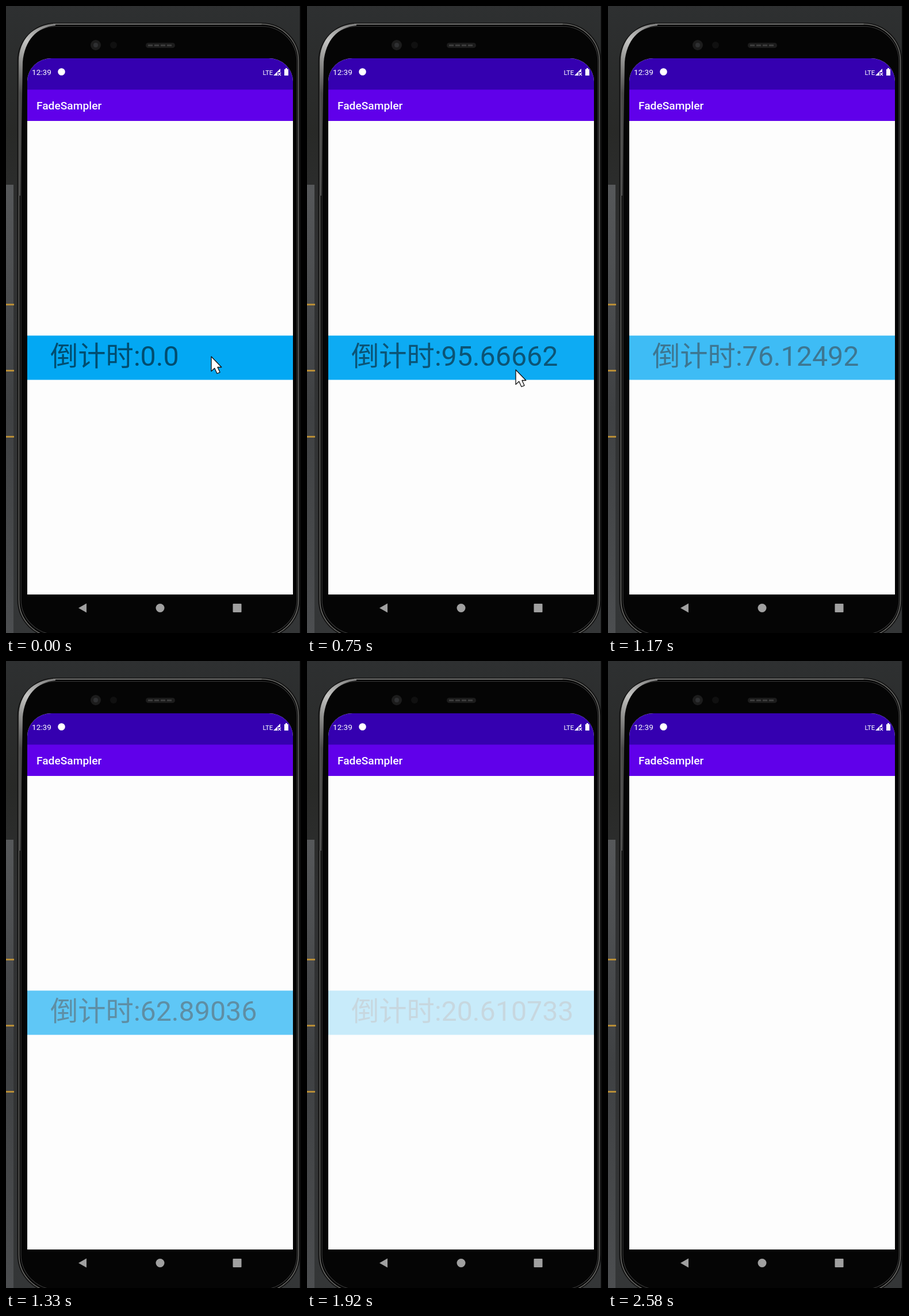
An HTML page for the animation above (2660 ms loop, 513 px wide and 1091 px high).

```html
<!DOCTYPE html>
<html lang="zh-CN">
<head>
<meta charset="utf-8">
<title>Fading countdown</title>
<style>
  html, body { margin: 0; width: 100%; height: 100%; overflow: hidden; background: #2d2e2e; }
  svg { display: block; position: fixed; inset: 0; width: 100%; height: 100%; }
  text { font-family: Roboto, "Noto Sans CJK SC", "Noto Sans CJK", sans-serif; }
</style>
</head>
<body>
<svg viewBox="0 0 513 1091" preserveAspectRatio="none">
  <defs>
    <linearGradient id="desk" x1="0" y1="0" x2="0" y2="1">
      <stop offset="0" stop-color="#2e3031"/>
      <stop offset=".2" stop-color="#282927"/>
      <stop offset=".4" stop-color="#303132"/>
      <stop offset="1" stop-color="#343637"/>
    </linearGradient>
    <linearGradient id="panel" x1="0" y1="0" x2="0" y2="1">
      <stop offset="0" stop-color="#56585a"/>
      <stop offset=".5" stop-color="#3f4143"/>
      <stop offset="1" stop-color="#4c4e50"/>
    </linearGradient>
    <linearGradient id="glint" gradientUnits="userSpaceOnUse" x1="22" y1="150" x2="95" y2="32">
      <stop offset="0" stop-color="#4a4a49"/>
      <stop offset=".6" stop-color="#c4c4c2"/>
      <stop offset="1" stop-color="#777"/>
    </linearGradient>
    <clipPath id="screen">
      <path d="M37 1024V131A42 40 0 0 1 79 91H457A42 40 0 0 1 499 131V1024Z"/>
    </clipPath>
  </defs>

  <rect width="513" height="1091" fill="url(#desk)"/>
  <rect y="311" width="13" height="780" fill="url(#panel)"/>
  <path d="M0 519.5H14M0 634.5H14M0 749.5H14" stroke="#b78d37" stroke-width="3"/>
  <rect x="511" width="2" height="1091" fill="#080808"/>

  <!-- phone body -->
  <rect x="20.5" y="30" width="490" height="1069" rx="66" fill="#050505" stroke="#151515" stroke-width="2"/>
  <rect x="22.5" y="31.5" width="486" height="1066" rx="64" fill="none" stroke="#70706d" stroke-width="1.5"/>
  <rect x="26" y="35.5" width="480" height="1058" rx="61" fill="none" stroke="#383838" stroke-width="1.2"/>
  <path d="M22.5 330V96C23 58 46 33 86 31.5V34C54 36 32 60 29 98L25 330Z" fill="url(#glint)"/>
  <path d="M82 31.5H444.5" stroke="#858583" stroke-width="1.5"/>
  <circle cx="156" cy="68" r="9" fill="#1c1c1c"/>
  <circle cx="156" cy="68" r="4" fill="#2f3032"/>
  <circle cx="187" cy="68" r="6" fill="#101010"/>
  <rect x="243" y="64" width="51" height="9" rx="4.5" fill="#1c1c1c"/>
  <path d="M247 68.5H291" stroke="#3c3c3c" stroke-width="3" stroke-dasharray="8 3"/>

  <!-- screen -->
  <g clip-path="url(#screen)">
    <rect x="37" y="91" width="462" height="933" fill="#fdfdfd"/>
    <rect x="37" y="91" width="462" height="56" fill="#3500b0"/>
    <rect x="37" y="145.5" width="462" height="54.5" fill="#6000ea"/>
  </g>
  <g fill="#fff">
    <text x="45" y="120" font-size="13.6">12:39</text>
    <circle cx="96.5" cy="114.5" r="6.3"/>
    <text x="446.5" y="119.5" font-size="11.3">LTE</text>
    <path d="M465 121L477 109V115H472V121Z"/>
    <path d="M473 116L478 121M478 116L473 121" stroke="#fff" stroke-width="1.2"/>
    <path d="M484 110H486V108H489V110H491V121H484Z"/>
    <text x="53" y="180" font-size="19.2" font-weight="500">FadeSampler</text>
  </g>

  <g id="band">
    <rect x="37" y="573.5" width="462" height="77" fill="#03a8f3"/>
    <text id="label" x="77" y="625.5" font-size="48.3" fill="#000" fill-opacity=".54"></text>
  </g>

  <g fill="#a0a0a0">
    <path d="M126 1047.5L140 1039.5V1055.5Z"/>
    <circle cx="268" cy="1047.5" r="7.5"/>
    <rect x="394.5" y="1040" width="15" height="15" rx="1"/>
  </g>

  <path id="cursor" d="M0 0V25.5L5.7 20.3L10 29.5L15 27.3L10.9 18.5H17.8Z"
        fill="#fff" stroke="#111" stroke-width="1.3" stroke-linejoin="round"/>
</svg>
<script>
const LOOP = 2660, FADE = 2000, VSYNC = 50 / 3;
const $ = id => document.getElementById(id);
const band = $('band'), label = $('label'), cursor = $('cursor');

const clock = [[6, 17], [9, 267], [14, 650], [19, 1100], [23, 1400], [26, 1684], [30, FADE]];
const pointer = [[8, 357, 610], [9, 363, 633], [10, 404, 768], [11, 474, 996]];

// Twelve captures per second, rounded to 10 ms
const stepStart = k => 10 * Math.round(k * 25 / 3);

function stepAt(t) {
  let k = 0;
  while (stepStart(k + 1) <= t) k++;
  return Math.min(k, 31);
}

function track(keys, k, col = 1) {
  if (k <= keys[0][0]) return keys[0][col];
  for (let i = 1; i < keys.length; i++) {
    const a = keys[i - 1], b = keys[i];
    if (k <= b[0]) return a[col] + (b[col] - a[col]) * (k - a[0]) / (b[0] - a[0]);
  }
  return keys[keys.length - 1][col];
}

// Accelerate-decelerate from 100 to 0 in single precision
function countAt(ms) {
  const f = Math.fround;
  const turn = f(f(ms / FADE) + 1) * Math.PI;
  const eased = f(f(Math.cos(turn) / 2) + 0.5);
  return f(100 + f(eased * -100));
}

// Shortest decimal that identifies a single-precision number
function floatText(v) {
  let s = '';
  for (let digits = 1; digits <= 9; digits++) {
    s = String(Number(v.toPrecision(digits)));
    if (Math.fround(Number(s)) === v) break;
  }
  return s.includes('.') ? s : s + '.0';
}

function draw(t) {
  const k = stepAt(t);
  let alpha = 1, value = 0;
  if (k >= 6) {
    const ticks = Math.round(track(clock, k) / VSYNC);
    value = countAt(Math.ceil(ticks * VSYNC - 1e-6));
    alpha = value / 100;
  }
  label.textContent = '倒计时:' + floatText(value);
  band.setAttribute('opacity', alpha);
  cursor.setAttribute('visibility', k < 12 ? 'visible' : 'hidden');
  cursor.setAttribute('transform', `translate(${track(pointer, k)} ${track(pointer, k, 2)})`);
}

const start = performance.now();
function tick() {
  draw((performance.now() - start) % LOOP);
  requestAnimationFrame(tick);
}
tick();
</script>
</body>
</html>
```
